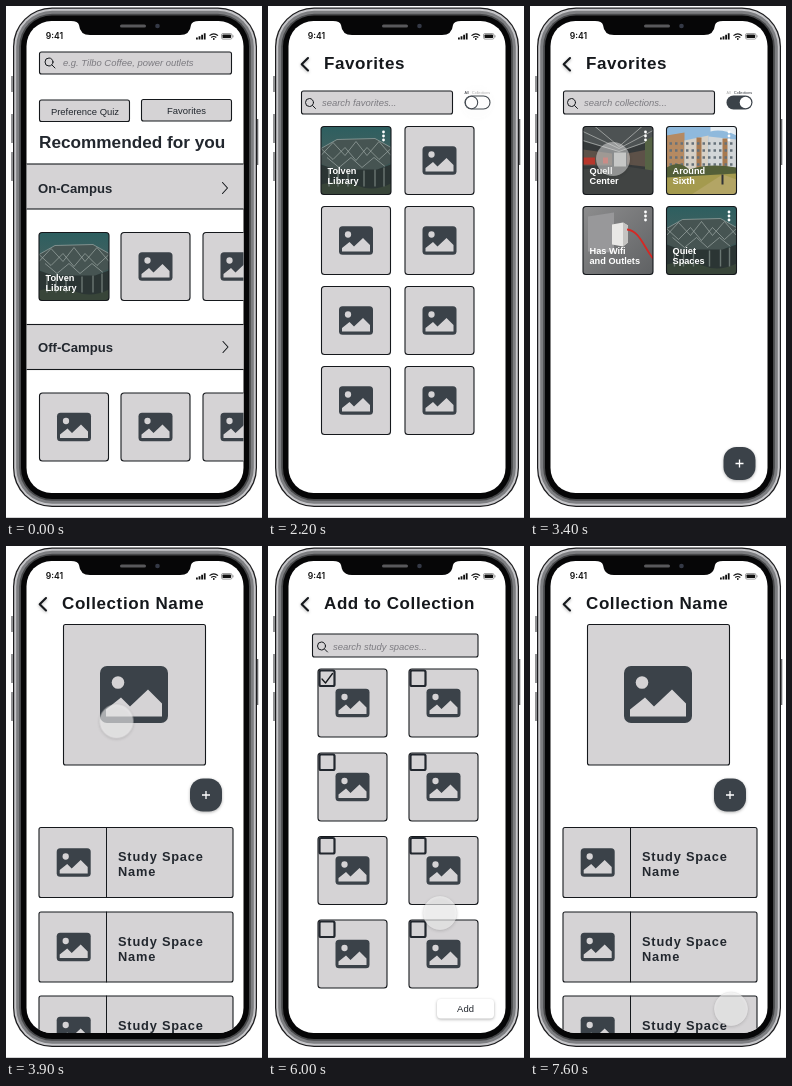
An HTML page for the animation above (7700 ms loop, 256 by 512 pixels).

```html
<!DOCTYPE html>
<html lang="en">
<head>
<meta charset="utf-8">
<title>Study spaces prototype</title>
<style>
  html, body { margin: 0; width: 100%; height: 100%; overflow: hidden; background: #fff; }
  svg { display: block; }
  #stage { width: 100%; height: 100%; font-family: "Liberation Sans", Arial, Helvetica, sans-serif; fill: #22272e; }
  .bold { font-weight: bold; }
  .title { font: bold 17px "Liberation Sans", Arial, sans-serif; letter-spacing: .6px; fill: #15181c; }
  .hint { font-size: 9.45px; font-style: italic; fill: #7c7b80; }
  .button { font-size: 9.45px; text-anchor: middle; }
  .band { font-size: 13.1px; font-weight: bold; }
  .label { font-size: 9.2px; font-weight: bold; fill: #fff; }
  .item { font-size: 12.8px; font-weight: bold; letter-spacing: .8px; }
  .tiny { font-size: 3.7px; }
  .clock { font: 600 8.6px Inter, "Liberation Sans", sans-serif; }
  .box { fill: #d5d3d5; stroke: #15181c; stroke-width: 1.1; }
  .line { fill: none; stroke: #15181c; stroke-linecap: round; stroke-linejoin: round; }
  .dark { fill: #3b4249; }
  .soft { filter: drop-shadow(0 1.5px 1.5px rgba(0, 0, 0, .3)); }

  .page, #check { animation: 7.7s step-end infinite; visibility: hidden; }
  #home { animation-name: home; }
  #favorites { animation-name: favorites; }
  #collections { animation-name: collections; }
  #detail { animation-name: detail; }
  #add { animation-name: add; }
  #check { animation-name: check; }
  #pointer { animation: pointer 7.7s ease-in-out infinite; filter: drop-shadow(0 1px 1.5px rgba(0, 0, 0, .22)); }
  #pointer circle { animation: press 7.7s linear infinite; }

  @keyframes home { 0% { visibility: visible } 19.22%, 100% { visibility: hidden } }
  @keyframes favorites { 0% { visibility: hidden } 19.22% { visibility: visible } 30.91%, 100% { visibility: hidden } }
  @keyframes collections { 0% { visibility: hidden } 30.91% { visibility: visible } 45.19%, 100% { visibility: hidden } }
  @keyframes detail {
    0% { visibility: hidden } 45.19% { visibility: visible }
    58.18% { visibility: hidden } 86.75%, 100% { visibility: visible }
  }
  @keyframes add { 0% { visibility: hidden } 58.18% { visibility: visible } 86.75%, 100% { visibility: hidden } }
  @keyframes check { 0% { visibility: hidden } 72.47% { visibility: visible } 86.75%, 100% { visibility: hidden } }
  @keyframes pointer {
    0%, 7.14% { transform: translate(282px, 417px) }
    15.58%, 19.48% { transform: translate(181px, 104px) }
    27.27%, 32.47% { transform: translate(209px, 96px) }
    41.56%, 48.05% { transform: translate(83px, 153px) }
    55.84%, 60.39% { transform: translate(200px, 248px) }
    67.53% { transform: translate(175px, 358px) }
    70.13%, 75.32% { transform: translate(60px, 136px) }
    77.92% { transform: translate(172px, 367px) }
    85.71%, 100% { transform: translate(201px, 463px) }
  }
  @keyframes press {
    0%, 15% { opacity: 1 } 16.5%, 19% { opacity: .6 } 21%, 26% { opacity: 1 }
    28%, 30.5% { opacity: .08 } 33%, 42% { opacity: 1 } 43.5%, 45% { opacity: .75 } 47%, 100% { opacity: 1 }
  }
</style>
</head>
<body>
<svg id="stage" viewBox="0 0 256 512">
  <defs>
    <clipPath id="screen"><rect x="20.5" y="13" width="217" height="474" rx="25"/></clipPath>
    <clipPath id="round"><rect width="70" height="68" rx="3"/></clipPath>
    <linearGradient id="teal" x2="0" y2="1">
      <stop offset="0" stop-color="#2d5f60"/><stop offset=".4" stop-color="#41605f"/><stop offset="1" stop-color="#2a3635"/>
    </linearGradient>
    <linearGradient id="wall" x2="1" y2="1">
      <stop offset="0" stop-color="#8d8d8e"/><stop offset="1" stop-color="#5f6163"/>
    </linearGradient>

    <!-- picture placeholder, 68 x 57, centred -->
    <g id="icon">
      <rect class="dark" x="-34" y="-28.5" width="68" height="57" rx="7"/>
      <g fill="#d5d3d5">
        <circle cx="-16" cy="-12" r="6.3"/>
        <path d="M-28 22V15L-13 3L-4 12L14 -5L28 9V22Z"/>
      </g>
    </g>
    <g id="half"><use href="#icon" transform="scale(.5)"/></g>

    <g id="card"><rect class="box" width="69" height="68" rx="3"/><use href="#half" x="34.5" y="34"/></g>
    <g id="pick">
      <use href="#card"/>
      <rect x="1.5" y="1.5" width="15" height="15.5" rx="1.5" fill="#d5d3d5" stroke="#22272e" stroke-width="2.2"/>
    </g>
    <g id="space">
      <rect class="box" width="194" height="70" rx="2"/>
      <path class="line" d="M67.5 0V70"/>
      <use href="#half" x="34.7" y="35"/>
      <text class="item" x="79" y="33.5">Study Space</text>
      <text class="item" x="79" y="48.5">Name</text>
    </g>
    <g id="rim"><rect width="70" height="68" rx="3" fill="none" stroke="#15181c" stroke-width="1.1"/></g>
    <g id="dots" fill="#fff"><circle r="1.4"/><circle cy="4" r="1.4"/><circle cy="8" r="1.4"/></g>
    <g id="lens" class="line"><circle cx="-1" cy="-1" r="4"/><path d="M2 2L5 5"/></g>
    <path id="back" class="line soft" stroke-width="2.1" d="M40 52L33.7 58.2L40 64.5"/>
    <path id="next" class="line" stroke-width="1.1" d="M0 -5.5L5 0L0 5.5"/>
    <g id="plus" class="soft">
      <rect class="dark" x="-16" y="-16.5" width="32" height="33" rx="13"/>
      <path d="M-4 0H4M0 -4V4" stroke="#fff" stroke-width="1.3"/>
    </g>

    <g id="library" clip-path="url(#round)">
      <rect width="70" height="68" fill="url(#teal)"/>
      <path d="M0 22L16 13L54 12L70 21V36L55 44H14L0 37Z" fill="#465452"/>
      <path d="M0 22L16 13L54 12L70 21M0 29L12 16L24 29L35 15L46 29L58 15L70 29M0 22L12 33L24 21L35 34L46 21L58 33L70 22M6 31L18 41L30 31L41 41L53 31L64 40"
        fill="none" stroke="#a3aeab" stroke-opacity=".65" stroke-width="1"/>
      <path d="M0 38L14 43H56L70 38V68H0Z" fill="#2b3534"/>
      <path d="M0 58Q20 52 36 59T70 57V68H0Z" fill="#384539"/>
      <path d="M8 42V60M17 43V60M27 44V60M43 44V60M54 43V60M63 41V60" stroke="#6a7672" stroke-width="1.4"/>
    </g>
    <g id="hall" clip-path="url(#round)">
      <rect width="70" height="68" fill="#35393a"/>
      <path d="M0 0H70V14L36 25L0 15Z" fill="#4d5253"/>
      <path d="M0 5L36 22L70 4M12 0L36 20L59 0M0 14L36 25L70 13" fill="none" stroke="#b9bcba" stroke-opacity=".7"/>
      <path d="M0 23L29 27V39H0ZM44 27L70 22V41L44 38Z" fill="#5d5148"/>
      <path d="M0 31H12V38H0ZM20 31H25V37H20Z" fill="#b7372c"/>
      <path d="M62 14L70 10V50L62 46Z" fill="#566345"/>
      <path d="M31 26H43V43H31Z" fill="#aeb1ae"/>
      <path d="M0 43L31 40H43L70 44V68H0Z" fill="#414443"/>
    </g>
    <g id="campus" clip-path="url(#round)">
      <rect width="70" height="68" fill="#8fb9dc"/>
      <path d="M44 0H70V9Q56 2 44 5Z" fill="#e6edf2"/>
      <path d="M0 9L18 6V46H0Z" fill="#b58a62"/>
      <path d="M18 14L42 9V46H18Z" fill="#d6d0c6"/>
      <path d="M42 10L70 13V46H42Z" fill="#d2d6d8"/>
      <path d="M30 11H35V46H30ZM56 12H61V46H56Z" fill="#a8794f"/>
      <path d="M3 17H66M3 24H66M3 31H66M3 38H66" stroke="#66717a" stroke-width="2.4" stroke-dasharray="2.5 3"/>
      <path d="M0 41Q12 33 23 43Q43 36 70 41V68H0Z" fill="#535f38"/>
      <path d="M0 51L70 47V68H0Z" fill="#a49a4e"/>
      <path d="M25 68L56 48L70 53V68Z" fill="#b3a565"/>
      <path d="M56 48V58" stroke="#303236" stroke-width="2"/>
    </g>
    <g id="plug" clip-path="url(#round)">
      <rect width="70" height="68" fill="url(#wall)"/>
      <path d="M5 10L31 6V46L5 45Z" fill="#98989a"/>
      <path d="M29 18L40 16L45 19V36L40 40L29 38Z" fill="#e9e8e6"/>
      <path d="M40 16L45 19V36L40 40Z" fill="#c4c3c1"/>
      <path d="M44 23C56 24 60 39 70 52" fill="none" stroke="#d62824" stroke-width="1.8"/>
    </g>
  </defs>

  <rect width="256" height="512" fill="#fff"/>
  <path d="M0 511.5H256" stroke="#d3d3d5"/>

  <!-- phone body, from the outer edge inwards -->
  <path d="M6 70V86M6 108V137M6 146V175M251.6 113V159" stroke="#66676a" stroke-width="1.4"/>
  <rect x="7" y="1.5" width="244" height="499.5" rx="39" fill="#1c1c1e"/>
  <rect x="8.2" y="2.7" width="241.6" height="497.1" rx="38" fill="#c6c6c9"/>
  <rect x="10.2" y="4.7" width="237.6" height="493.1" rx="36" fill="#7d7e81"/>
  <rect x="13.2" y="7.7" width="231.6" height="487.1" rx="33" fill="#48494b"/>
  <rect x="15" y="9.5" width="228" height="483.5" rx="31" fill="#060607"/>
  <rect x="20.5" y="15" width="217" height="472" rx="25" fill="#fff"/>

  <g clip-path="url(#screen)">
    <g id="home" class="page">
      <rect class="box" x="33.5" y="46" width="192" height="22" rx="2"/>
      <use href="#lens" x="44" y="57"/>
      <text class="hint" x="57" y="60">e.g. Tilbo Coffee, power outlets</text>
      <rect class="box" x="33.5" y="94" width="90" height="21.5" rx="2"/>
      <text class="button" x="79" y="108.7">Preference Quiz</text>
      <rect class="box" x="135.5" y="93.5" width="90" height="21.5" rx="2"/>
      <text class="button" x="180.5" y="107.5">Favorites</text>
      <text class="bold" font-size="17.2" x="33" y="142">Recommended for you</text>

      <rect class="box" x="20" y="158" width="220" height="45"/>
      <text class="band" x="32" y="186.5">On-Campus</text>
      <use href="#next" x="216.5" y="182"/>
      <use href="#library" x="33" y="226.5"/>
      <use href="#rim" x="33" y="226.5"/>
      <text class="label" x="39.5" y="274.5">Tolven</text>
      <text class="label" x="39.5" y="284.7">Library</text>
      <use href="#card" x="115" y="226.5"/>
      <use href="#card" x="197" y="226.5"/>

      <rect class="box" x="20" y="318.5" width="220" height="45"/>
      <text class="band" x="32" y="346">Off-Campus</text>
      <use href="#next" x="217" y="341"/>
      <use href="#card" x="33.5" y="387"/>
      <use href="#card" x="115" y="387"/>
      <use href="#card" x="197" y="387"/>
    </g>

    <g id="favorites" class="page">
      <use href="#back"/>
      <text class="title" x="56" y="63">Favorites</text>
      <rect class="box" x="33.5" y="85" width="151" height="23" rx="2"/>
      <use href="#lens" x="42.5" y="97.5"/>
      <text class="hint" x="54" y="100">search favorites...</text>
      <text class="tiny" x="196.5" y="88">All</text>
      <text class="tiny" x="204" y="88" fill="#aaa">Collections</text>
      <rect x="197" y="90" width="25" height="13" rx="6.5" fill="#fff" stroke="#3b4249" stroke-width="1.1"/>
      <circle cx="203.5" cy="96.5" r="6.2" fill="#fff" stroke="#3b4249" stroke-width="1.1"/>
      <use href="#library" x="53" y="120.5"/>
      <use href="#rim" x="53" y="120.5"/>
      <use href="#dots" x="115.5" y="126"/>
      <text class="label" x="59.5" y="167.5">Tolven</text>
      <text class="label" x="59.5" y="178">Library</text>
      <use href="#card" x="137" y="120.5"/>
      <use href="#card" x="53.5" y="200.5"/><use href="#card" x="137" y="200.5"/>
      <use href="#card" x="53.5" y="280.5"/><use href="#card" x="137" y="280.5"/>
      <use href="#card" x="53.5" y="360.5"/><use href="#card" x="137" y="360.5"/>
    </g>

    <g id="collections" class="page">
      <use href="#back"/>
      <text class="title" x="56" y="63">Favorites</text>
      <rect class="box" x="33.5" y="85" width="151" height="23" rx="2"/>
      <use href="#lens" x="42.5" y="97.5"/>
      <text class="hint" x="54" y="100">search collections...</text>
      <text class="tiny" x="196.5" y="88" fill="#aaa">All</text>
      <text class="tiny" x="204" y="88">Collections</text>
      <rect class="dark" x="196.5" y="89.5" width="26" height="14" rx="7"/>
      <circle cx="215.5" cy="96.5" r="5.8" fill="#fff"/>
      <use href="#hall" x="53" y="120.5"/><use href="#rim" x="53" y="120.5"/>
      <use href="#campus" x="136.5" y="120.5"/><use href="#rim" x="136.5" y="120.5"/>
      <use href="#plug" x="53" y="200.5"/><use href="#rim" x="53" y="200.5"/>
      <use href="#library" x="136.5" y="200.5"/><use href="#rim" x="136.5" y="200.5"/>
      <use href="#dots" x="115.5" y="126"/><use href="#dots" x="199" y="126"/>
      <use href="#dots" x="115.5" y="206"/><use href="#dots" x="199" y="206"/>
      <g class="label">
        <text x="59.5" y="167.5">Quell</text><text x="59.5" y="178">Center</text>
        <text x="142.5" y="167.5">Around</text><text x="142.5" y="178">Sixth</text>
        <text x="59.5" y="247.5">Has Wifi</text><text x="59.5" y="258">and Outlets</text>
        <text x="142.5" y="247.5">Quiet</text><text x="142.5" y="258">Spaces</text>
      </g>
      <use href="#plus" x="209.5" y="457.5"/>
    </g>

    <g id="detail" class="page">
      <use href="#back"/>
      <text class="title" x="56" y="63">Collection Name</text>
      <rect class="box" x="57.5" y="78.5" width="142" height="140.5" rx="2"/>
      <use href="#icon" x="128" y="148.5"/>
      <use href="#plus" x="200" y="249"/>
      <use href="#space" x="33" y="281.5"/>
      <use href="#space" x="33" y="366"/>
      <use href="#space" x="33" y="450"/>
    </g>

    <g id="add" class="page">
      <use href="#back"/>
      <text class="title" x="56" y="63">Add to Collection</text>
      <rect class="box" x="44.5" y="88" width="165.5" height="23" rx="2"/>
      <use href="#lens" x="54.5" y="101"/>
      <text class="hint" x="65" y="104">search study spaces...</text>
      <use href="#pick" x="50" y="123"/><use href="#pick" x="141" y="123"/>
      <use href="#pick" x="50" y="207"/><use href="#pick" x="141" y="207"/>
      <use href="#pick" x="50" y="290.5"/><use href="#pick" x="141" y="290.5"/>
      <use href="#pick" x="50" y="374"/><use href="#pick" x="141" y="374"/>
      <path id="check" class="line" stroke-width="1.3" d="M54 133L57.5 137L64.5 127.5"/>
      <rect class="soft" x="169" y="453" width="57" height="19.5" rx="4" fill="#fff"/>
      <text class="button" x="197.5" y="466.3">Add</text>
    </g>

    <g fill="#111">
      <text class="clock" x="39.8" y="33">9:41</text>
      <path d="M190 31.5h1.8v2h-1.8zM192.6 30.3h1.8v3.2h-1.8zM195.2 28.8h1.8v4.7h-1.8zM197.8 27.3h1.8v6.2h-1.8z"/>
      <path d="M203.5 29.6Q207.8 26 212 29.6M205.2 31.5Q207.8 29.5 210.3 31.5" fill="none" stroke="#111" stroke-width="1.2"/>
      <circle cx="207.8" cy="33" r=".9"/>
      <rect x="215.5" y="27.5" width="10.5" height="5.6" rx="1.5" fill="none" stroke="#777" stroke-width=".7"/>
      <rect x="216.5" y="28.5" width="8.5" height="3.6" rx=".7"/>
      <path d="M227 29.3v2" stroke="#777" stroke-width=".8"/>
    </g>
  </g>

  <path d="M65 12H193V15Q186 15 185 19Q184 29 174 29H84Q74 29 73 19Q72 15 65 15Z" fill="#060607"/>
  <rect x="114" y="18.5" width="26" height="3" rx="1.5" fill="#58585b"/>
  <circle cx="151.5" cy="20" r="2.3" fill="#343946"/>

  <g id="pointer"><circle r="17" fill="#f7f7f7" fill-opacity=".62" stroke="#000" stroke-opacity=".04"/></g>
</svg>
</body>
</html>
```
